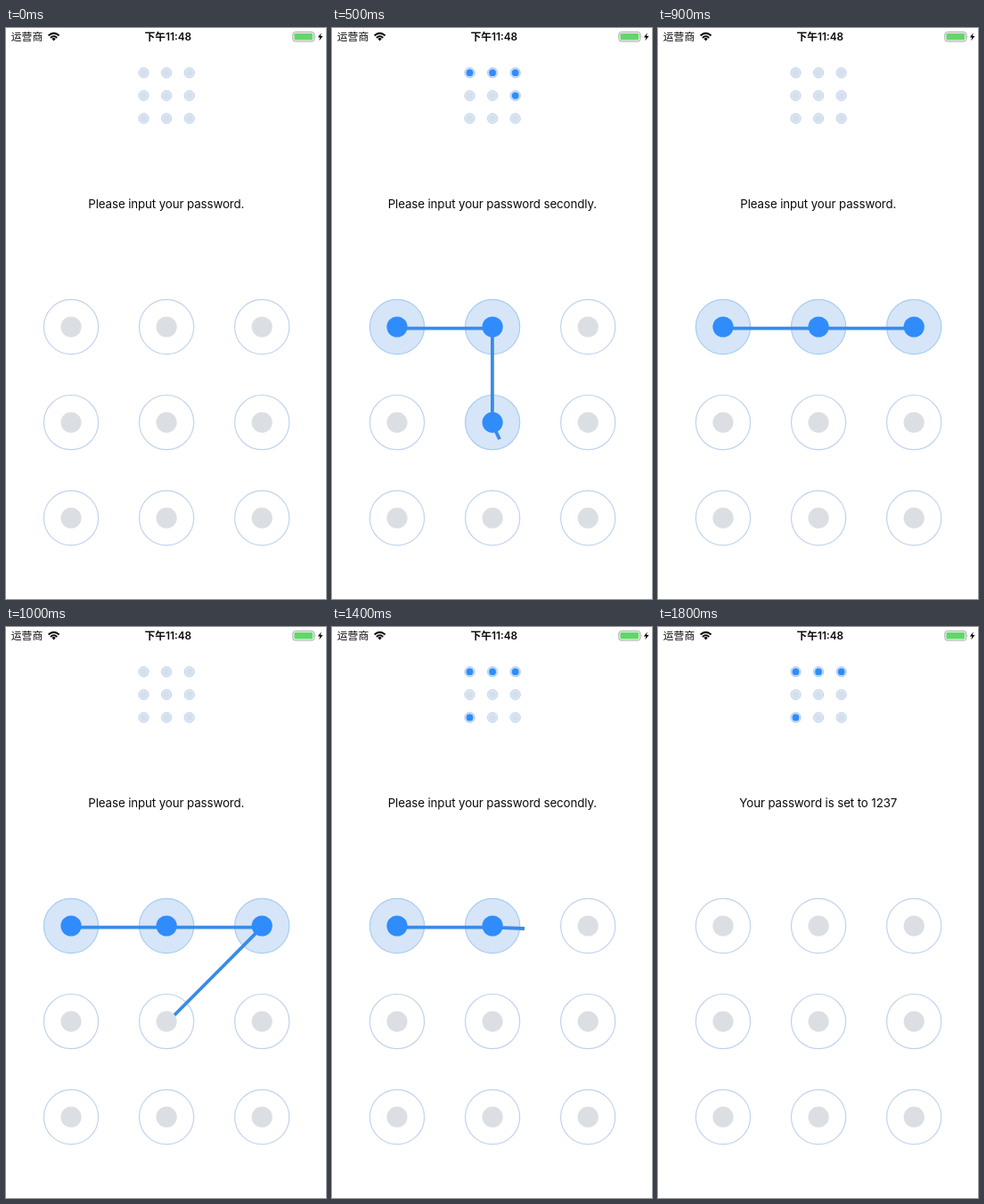
An HTML page for the animation above (2 s loop, 359 px wide and 640 px high).

```html
<!DOCTYPE html>
<html lang="en">
<head>
<meta charset="utf-8">
<title>Pattern lock</title>
<style>
  html, body { margin: 0; width: 100%; height: 100%; overflow: hidden; background: #fff; }
  svg { display: block; width: 100%; height: 100%; }
  text { font-family: Inter, "Noto Sans CJK SC", "Noto Sans CJK", sans-serif; fill: #0a0a0a; text-anchor: middle; }
  .status { font-size: 11.8px; }
  .time { font-weight: 600; }
  #prompt { font-size: 13.3px; letter-spacing: -0.1px; }
  .ring { fill: #fff; stroke: #bfd3ee; stroke-width: 1.2; }
  .dot { fill: #dbdfe4; }
  .ring.on { fill: #d6e6f8; stroke: #a8ccf1; }
  .dot.on { fill: #308cfb; }
  #mini .ring { fill: #e1eaf5; stroke: #bdd4ef; stroke-width: 1; }
  #mini .ring.on { fill: #d0e3fa; stroke: #a5c9f2; }
  #mini .dot { fill: #d5dfeb; }
  #mini .dot.on { fill: #308cfb; }
  #trace { fill: none; stroke: #398be9; stroke-width: 3.8; }
</style>
</head>
<body>
<svg viewBox="0 0 359 640">
  <rect width="359" height="640" fill="#fff"/>
  <text class="status" x="23.5" y="14">运营商</text>
  <g fill="none" stroke="#0a0a0a" stroke-width="2">
    <path d="M47.6 8.4 Q53.6 3.4 59.6 8.4"/>
    <path d="M49.9 10.9 Q53.6 7.7 57.3 10.9"/>
  </g>
  <path d="M51.4 12 Q53.6 10.2 55.8 12 L53.6 14.4Z" fill="#0a0a0a"/>
  <text class="status time" x="181.8" y="14">下午11:48</text>
  <rect x="321.9" y="4.6" width="23.8" height="10.4" rx="2.4" fill="#fff" stroke="#a2a2a2"/>
  <rect x="323.4" y="6.1" width="20.8" height="7.4" rx="1.2" fill="#63d66b"/>
  <path d="M346.8 8.2 Q348.5 9.8 346.8 11.4Z" fill="#a2a2a2"/>
  <path d="M353.8 5.4 L349.8 10.4 H352.3 L351.3 14.2 L355.5 8.9 H352.9Z" fill="#0a0a0a"/>

  <g id="mini"></g>
  <text id="prompt" x="179.8" y="202"></text>
  <g id="rings"></g>
  <path id="trace"/>
  <g id="dots"></g>
</svg>
<script>
const $ = id => document.getElementById(id);
const FIRST = "Please input your password.";
const SECOND = "Please input your password secondly.";
const DONE = "Your password is set to 1237";

// One entry per 100 ms: prompt, preview, touched nodes, finger position
const steps = [
  [FIRST, "", ""],
  [FIRST, "", "12", [226, 338]],
  [FIRST, "", "123", [289, 396]],
  [SECOND, "1236", "1236"],
  [SECOND, "1236", ""],
  [SECOND, "1236", "125", [188, 461]],
  [SECOND, "1236", "1258"],
  [FIRST, "", ""],
  [FIRST, "", ""],
  [FIRST, "", "123"],
  [FIRST, "", "123", [178, 446]],
  [FIRST, "", "1237"],
  [SECOND, "1237", "1237"],
  [SECOND, "1237", ""],
  [SECOND, "1237", "12", [216, 338]],
  [SECOND, "1237", "123"],
  [SECOND, "1237", "123", [114, 456]],
  [SECOND, "1237", "1237"],
  [DONE, "1237", ""],
  [DONE, "1237", ""]
];

const place = (n, x, y, gap) => [x + (n - 1) % 3 * gap, y + Math.floor((n - 1) / 3) * gap];

function grid(parent, type, x, y, gap, r) {
  return Array.from({ length: 9 }, (_, i) => {
    const c = document.createElementNS("http://www.w3.org/2000/svg", "circle");
    const [cx, cy] = place(i + 1, x, y, gap);
    c.setAttribute("cx", cx);
    c.setAttribute("cy", cy);
    c.setAttribute("r", r);
    c.setAttribute("class", type);
    return parent.appendChild(c);
  });
}

const miniRings = grid($("mini"), "ring", 154.5, 50.2, 25.6, 5.6);
const miniDots = grid($("mini"), "dot", 154.5, 50.2, 25.6, 3.9);
const rings = grid($("rings"), "ring", 73, 335, 107.1, 30.6);
const dots = grid($("dots"), "dot", 73, 335, 107.1, 11.6);

function mark(list, on) {
  list.forEach((c, i) => c.classList.toggle("on", on.includes(i + 1)));
}

function show([prompt, preview, touched, finger]) {
  $("prompt").textContent = prompt;
  mark(miniRings, preview);
  mark(miniDots, preview);
  mark(rings, touched);
  mark(dots, touched);
  const points = [...touched].map(n => place(+n, 73, 336.7, 106.9));
  if (finger) points.push(finger);
  $("trace").setAttribute("d", points.length ? "M" + points.join("L") : "");
}

let current = -1;
function tick() {
  const i = Math.floor(performance.now() % 2000 / 100);
  if (i !== current) show(steps[current = i]);
  requestAnimationFrame(tick);
}
tick();
</script>
</body>
</html>
```
